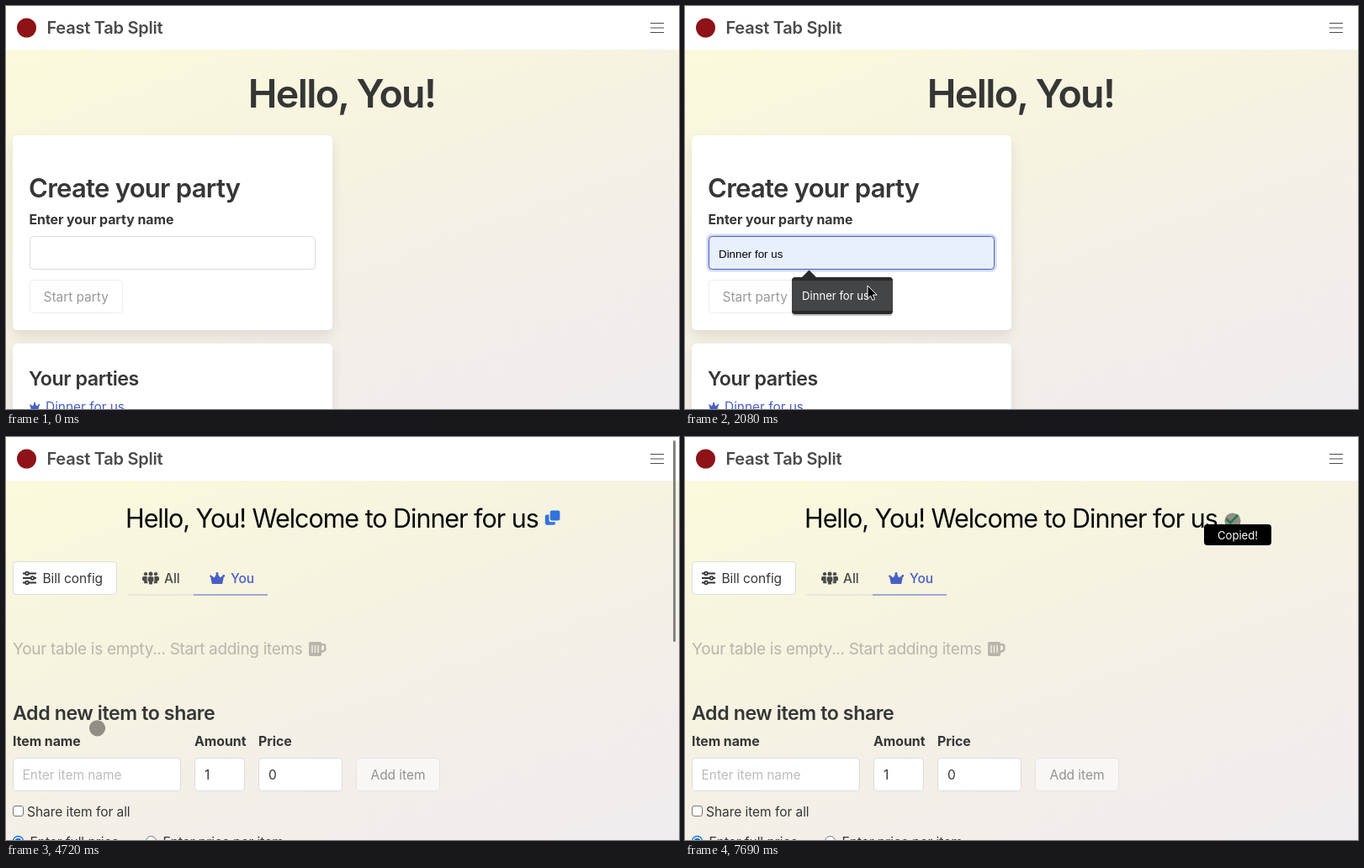
Animation, 800 px wide and 480 px high, one loop 8 s. Source, as an HTML page:

```html
<!DOCTYPE html>
<html lang="en">
<head>
<meta charset="utf-8">
<title>Feast Tab Split</title>
<style>
  html, body { margin: 0; width: 100%; height: 100%; overflow: hidden; }
  svg { display: block; width: 800px; height: 480px; }
  text {
    font: 400 15.5px Inter, sans-serif;
    font-optical-sizing: none;
    letter-spacing: -.003em;
    fill: #363636;
    white-space: pre;
  }
  .brand { font-size: 20px; font-weight: 600; letter-spacing: -.012em; fill: #4a4a4a; }
  .hero { font-size: 46.5px; font-weight: 600; letter-spacing: -.036em; text-anchor: middle; }
  .h2 { font-size: 31px; font-weight: 600; letter-spacing: -.023em; }
  .h3 { font-size: 23.2px; font-weight: 600; letter-spacing: -.018em; }
  .title { font-size: 30.5px; letter-spacing: -.034em; fill: #0a0a0a; }
  .label { font-size: 15.9px; font-weight: 700; }
  .tab { font-weight: 500; fill: #4a4a4a; }
  .empty { font-size: 19px; letter-spacing: -.016em; fill: #b8b5ab; }
  .preview { font: 13.33px "Liberation Sans", Arial, sans-serif; letter-spacing: 0; fill: #000; }
  .small { font-size: 13.2px; fill: #fff; }
  .hint { fill: #bcbcbc; }
  .box { fill: #fff; stroke: #dbdbdb; }
</style>
</head>
<body>
<svg viewBox="0 0 800 480" xmlns="http://www.w3.org/2000/svg">
  <defs>
    <linearGradient id="sky" gradientUnits="userSpaceOnUse" x1="276" y1="-100" x2="524" y2="580">
      <stop offset=".05" stop-color="#fbfadb"/>
      <stop offset=".4" stop-color="#f6f3e0"/>
      <stop offset=".72" stop-color="#f3eee9"/>
      <stop offset=".92" stop-color="#f2eded"/>
      <stop offset="1" stop-color="#f0ebef"/>
    </linearGradient>
    <filter id="lift" x="-20%" y="-20%" width="140%" height="150%">
      <feDropShadow dx="0" dy="7" stdDeviation="7" flood-color="#0a0a0a" flood-opacity=".09"/>
    </filter>
    <path id="crown" d="M0 4.5a1.4 1.4 0 0 1 2.6 0L5.6 6.6 8 2.6a1.5 1.5 0 1 1 2 0l2.4 4 3-2.1a1.4 1.4 0 1 1 1.4 1.3L15.2 14H2.8L1.2 5.8A1.4 1.4 0 0 1 0 4.5z"/>
  </defs>

  <rect width="800" height="480" fill="url(#sky)"/>
  <rect width="800" height="52" fill="#fff"/>
  <circle cx="24.5" cy="26" r="11.5" fill="#8e1218"/>
  <text class="brand" x="48.5" y="33">Feast Tab Split</text>
  <path d="M766 20.5h16M766 26h16M766 31.5h16" stroke="#4a4a4a"/>

  <g id="home">
    <text class="hero" x="399" y="121">Hello, You!</text>
    <g fill="#fff" filter="url(#lift)">
      <rect x="8" y="154" width="380" height="232" rx="6"/>
      <rect x="8" y="402" width="380" height="200" rx="6"/>
    </g>
    <text class="h2" x="27" y="228">Create your party</text>
    <text class="label" x="27.5" y="260">Enter your party name</text>
    <rect id="ring" x="27" y="273" width="342" height="42" rx="5" fill="none" stroke="#485fc7" stroke-opacity=".25" stroke-width="3"/>
    <rect id="field" x="28.5" y="274.5" width="339" height="39" rx="4"/>
    <text id="hinted" class="preview" x="40" y="300">Dinner for us</text>
    <text id="filled" x="40" y="300" style="fill:#000">Dinner for us</text>
    <g id="start">
      <rect class="box" x="28.5" y="326.5" width="110" height="39" rx="4"/>
      <text x="44.5" y="352">Start party</text>
    </g>
    <text class="h3" x="27" y="452">Your parties</text>
    <use href="#crown" transform="translate(28 472) scale(.68)" fill="#485fc7"/>
    <text x="47" y="482.5" style="fill:#485fc7">Dinner for us</text>

    <g id="popup">
      <rect x="127" y="324" width="120" height="45" rx="4" fill="#000" opacity=".25"/>
      <path d="M138 324l9.5-9.5 9.5 9.5z" fill="#292a2c"/>
      <rect x="127" y="323" width="120" height="44" rx="4" fill="#292a2c"/>
      <rect id="option" x="127" y="327" width="120" height="36"/>
      <text class="small" x="139" y="350">Dinner for us</text>
    </g>
  </g>

  <g id="party">
    <text class="title" x="142" y="108">Hello, You! Welcome to Dinner for us</text>
    <g id="copy" fill="#3273dc">
      <path d="M643 92.5h2.5v6.5a2.2 2.2 0 0 0 2.2 2.2h5.3v1.3a2.2 2.2 0 0 1-2.2 2.2H643a2.2 2.2 0 0 1-2.2-2.2v-7.8a2.2 2.2 0 0 1 2.2-2.2z"/>
      <rect x="646.8" y="87.5" width="11.6" height="12" rx="2.2"/>
    </g>
    <path id="check" d="M643.5 97.5l4.7 4.7 9.3-9.6" fill="none" stroke="#48c78e" stroke-width="2.8"/>

    <rect class="box" x="8.5" y="148.5" width="123" height="39" rx="4"/>
    <g stroke="#363636" stroke-width="1.8" fill="#fff">
      <path d="M20 162.5h16M20 168h16M20 173.5h16"/>
      <circle cx="25" cy="162.5" r="1.8"/><circle cx="31.5" cy="168" r="1.8"/><circle cx="25" cy="173.5" r="1.8"/>
    </g>
    <text x="43.5" y="174">Bill config</text>
    <path d="M144 188h79" stroke="#dbdbdb"/>
    <path d="M223 188h88" stroke="#485fc7"/>
    <g fill="#4a4a4a">
      <circle cx="172" cy="163" r="2.5"/><circle cx="166" cy="163.2" r="2.1"/><circle cx="178" cy="163.2" r="2.1"/>
      <path d="M168.6 168a1.8 1.8 0 0 1 1.8-1.8h3.2a1.8 1.8 0 0 1 1.8 1.8v3.4l-1.4 1v3h-4v-3l-1.4-1z"/>
      <path d="M162 168a2 2 0 0 1 2-2h3.6v6.2l.8.6v1.4h-4.2v-2.4l-2.2-1.4zM182 168a2 2 0 0 0-2-2h-3.6v6.2l-.8.6v1.4h4.2v-2.4l2.2-1.4z"/>
    </g>
    <text class="tab" x="188" y="174">All</text>
    <use href="#crown" x="242" y="161" fill="#485fc7"/>
    <text class="tab" x="267" y="174" style="fill:#485fc7">You</text>

    <text class="empty" x="8" y="259">Your table is empty... Start adding items</text>
    <path fill="#b8b5ab" fill-rule="evenodd" d="M361.5 244h12a1.5 1.5 0 0 1 1.5 1.5v.5h2.5a3 3 0 0 1 3 3v4a3 3 0 0 1-1.6 2.6L375 257.5v1.5a2 2 0 0 1-2 2h-11a2 2 0 0 1-2-2v-13.5a1.5 1.5 0 0 1 1.5-1.5zM375 248.5v6l2.6-1.3a.8.8 0 0 0 .5-.7v-3.2a.8.8 0 0 0-.8-.8z"/>
    <path d="M364 248v9M367.5 248v9M371 248v9" stroke="#f4f1e2" stroke-width="1.4"/>

    <text class="h3" x="8" y="337">Add new item to share</text>
    <text class="label" x="8" y="368">Item name</text>
    <text class="label" x="224" y="368">Amount</text>
    <text class="label" x="300" y="368">Price</text>
    <rect class="box" x="8.5" y="382.5" width="199" height="39" rx="4"/>
    <rect class="box" x="224.5" y="382.5" width="59" height="39" rx="4"/>
    <rect class="box" x="300.5" y="382.5" width="99" height="39" rx="4"/>
    <text class="hint" x="19.5" y="408">Enter item name</text>
    <text x="236" y="408">1</text>
    <text x="312" y="408">0</text>
    <g opacity=".5">
      <rect class="box" x="416.5" y="382.5" width="99" height="39" rx="4"/>
      <text x="433.5" y="408">Add item</text>
    </g>
    <rect x="8.5" y="439.5" width="12" height="12" rx="2.5" fill="#fff" stroke="#767676"/>
    <text x="25" y="452">Share item for all</text>
    <circle cx="14.5" cy="481.5" r="6" fill="#fff" stroke="#1a73d8" stroke-width="1.3"/>
    <circle cx="14.5" cy="481.5" r="3.8" fill="#1a73d8"/>
    <text x="28.5" y="487.5">Enter full price</text>
    <circle cx="172.5" cy="481.5" r="6" fill="#fff" stroke="#767676"/>
    <text x="186.5" y="487.5">Enter price per item</text>
    <rect id="scroll" x="793" y="4" width="3" height="240" rx="1.5" fill="#858380"/>

    <g id="tip">
      <rect x="617" y="104" width="80" height="25" rx="4"/>
      <text class="small" x="657" y="122" text-anchor="middle">Copied!</text>
    </g>
  </g>

  <circle id="dot" r="9.6"/>
  <path id="arrow" d="M0 0v15.5l3.6-3.4 2.3 5.3 2.7-1.2-2.3-5.1h4.9z" fill="#000" stroke="#fff"/>
</svg>
<script>
  const LOOP = 8000;
  const $ = id => document.getElementById(id);
  const show = (id, on) => $(id).setAttribute("visibility", on ? "inherit" : "hidden");
  const set = (id, attrs) => {
    for (const k in attrs) $(id).setAttribute(k, attrs[k]);
  };

  // Pointer positions, each held until the next: time, x, y
  const trail = [
    [100, 253, 337], [430, 235, 306], [760, 234, 302], [1090, 233, 300],
    [2080, 217, 333], [2410, 215, 338], [2740, 213, 347],
    [3070, 126, 345], [3400, 122, 296], [3730, 124, 294], [4060, 108, 346], [4390, 108.5, 346.8],
    [5050, 160, 308], [5380, 235, 250], [5710, 345, 205], [6040, 659, 106],
    [6370, 656, 105], [6700, 654.3, 104.5], [7030, 652, 102], [7360, 651, 100]
  ];
  const on = {
    focus: 1750, preview: 2080, fill: 2740, press: 4390, open: 4720, fade: 5050, rest: 5380, copied: 7690
  };

  function draw(t) {
    const from = (a, b = LOOP) => t >= a && t < b;
    const focused = from(on.focus);
    const ready = from(on.fill);

    show("home", !from(on.open));
    show("party", from(on.open));

    show("ring", focused && !from(on.open));
    set("field", {
      fill: from(on.preview) ? "#e8f0fe" : "#fff",
      stroke: focused ? "#485fc7" : "#dbdbdb"
    });
    show("hinted", from(on.preview, on.fill));
    show("filled", from(on.fill, on.open));
    set("start", { opacity: ready ? 1 : .5 });
    show("popup", from(on.focus, on.fill));
    set("option", { fill: from(on.preview) ? "#434547" : "#3a3b3d" });

    set("scroll", { opacity: from(on.open, on.fade) ? 1 : from(on.fade, on.rest) ? .5 : 0 });
    show("copy", from(on.open, on.copied));
    show("check", from(on.copied));
    show("tip", from(on.copied));

    const spot = trail.filter(p => p[0] <= t).pop();
    const inPopup = from(on.preview, on.fill);
    show("dot", spot && !inPopup);
    show("arrow", inPopup);
    if (!spot) return;
    set("dot", { cx: spot[1], cy: spot[2], "fill-opacity": from(on.press, on.open) ? .5 : .41 });
    set("arrow", { transform: `translate(${spot[1]} ${spot[2]})` });
  }

  const begin = performance.now();
  function tick() {
    draw((performance.now() - begin) % LOOP);
    requestAnimationFrame(tick);
  }
  tick();
</script>
</body>
</html>
```
